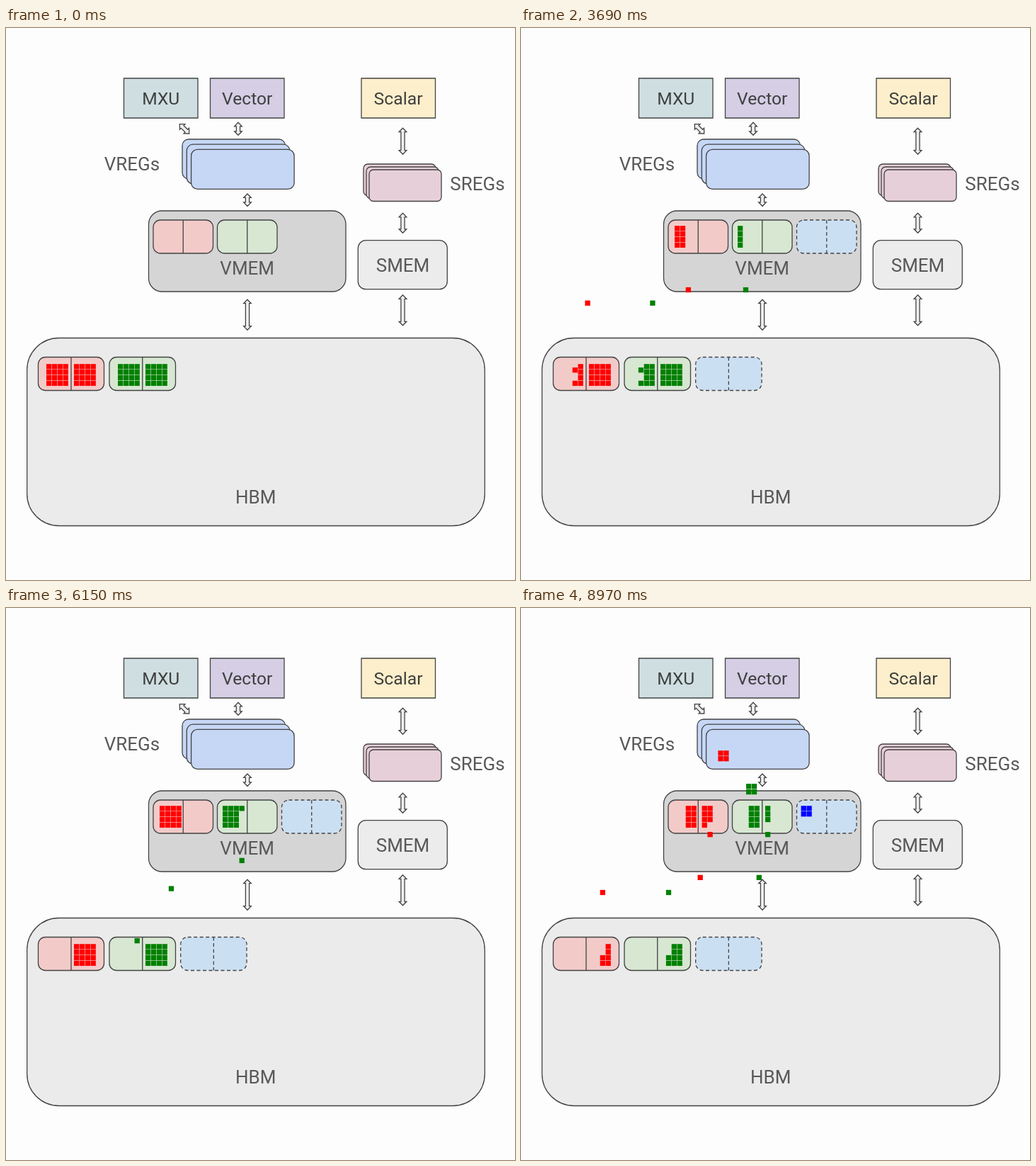
These frames come from a looping animation (719x779 px, 9000 ms). An HTML page with a canvas:

```html
<!DOCTYPE html>
<html lang="en">
<head>
<meta charset="utf-8">
<title>Memory pipeline</title>
<style>
  html, body { margin: 0; width: 100%; height: 100%; overflow: hidden; background: #fdfdfd; }
  canvas { display: block; }
</style>
</head>
<body>
<canvas id="stage" width="719" height="779"></canvas>
<script>
const ctx = document.getElementById('stage').getContext('2d');
const LOOP = 9000, INK = '#434343', LABEL = '#595959';
const PITCH = 7.85, CELL = 7.3;
const HBM_Y = 474.2, VMEM_Y = 279.2, VREG_Y = 185.5;
const clamp = (v, lo, hi) => Math.min(hi, Math.max(lo, v));
const smooth = p => p * p * (3 - 2 * p);

// Left edges of the 4 x 4 grids; each stream has two halves.
const streams = [
  { color: '#ff0000', hbm: [57, 96], vmem: [217, 255.6], vreg: 278.4, lag: 0, tileLag: 0 },
  { color: '#008000', hbm: [158, 197], vmem: [306, 345], vreg: 320.4, lag: 4, tileLag: 3 }
];
const output = { color: '#0000ff', vreg: 362.4, vmem: 395.6 };

// Time at which the cell queue reaches a given slot; one slot is one leg of a route.
const clockPoints = [[953, 0], [1620, 2.5], [2970, 7.41], [7380, 23.93], [8970, 29.86], [9238, 30.86]];
function slotAt(t) {
  const i = Math.max(1, clockPoints.findIndex(p => p[0] > t));
  const [t0, s0] = clockPoints[i - 1], [t1, s1] = clockPoints[i];
  return s0 + (s1 - s0) * (t - t0) / (t1 - t0);
}
const COMPUTE_START = 6868, COMPUTE_LEG = 152, COMPUTE_CYCLE = 9;

// Three equal legs: half the height, the full width, the other half of the height.
function route(dx, dy, legs) {
  const leg = i => clamp(legs - i, 0, 1);
  return [dx * leg(1), dy / 2 * (leg(0) + leg(2))];
}

function box(x, y, w, h, r, fill, dashed) {
  ctx.beginPath();
  ctx.roundRect(x, y, w, h, r);
  ctx.fillStyle = fill;
  ctx.fill();
  ctx.setLineDash(dashed ? [5, 3.5] : []);
  ctx.stroke();
}

function pair(x, y, w, h, fill, dashed) {
  box(x, y, w, h, 10, fill, dashed);
  ctx.beginPath();
  ctx.moveTo(x + w / 2, y);
  ctx.lineTo(x + w / 2, y + h);
  ctx.stroke();
  ctx.setLineDash([]);
}

function stack(x, y, w, h, r, stepX, stepY, fill) {
  for (let i = 0; i < 3; i++) box(x + i * stepX, y + i * stepY, w, h, r, fill);
}

function label(text, x, y, size = 26, color = LABEL) {
  ctx.font = `${size}px Roboto, sans-serif`;
  ctx.textAlign = 'center';
  ctx.fillStyle = color;
  ctx.fillText(text, x, y);
}

function arrow(x, y, length, angle = 0) {
  const end = length / 2, neck = end - 5.5;
  ctx.save();
  ctx.translate(x, y);
  ctx.rotate(angle);
  ctx.beginPath();
  for (const [px, py] of [[0, -end], [5.3, -neck], [2.6, -neck], [2.6, neck], [5.3, neck],
    [0, end], [-5.3, neck], [-2.6, neck], [-2.6, -neck], [-5.3, -neck]]) ctx.lineTo(px, py);
  ctx.closePath();
  ctx.fillStyle = '#eeeeee';
  ctx.fill();
  ctx.stroke();
  ctx.restore();
}

function drawDiagram(t) {
  ctx.fillStyle = '#fdfdfd';
  ctx.fillRect(0, 0, 719, 779);
  ctx.strokeStyle = INK;
  ctx.lineWidth = 1.3;

  box(166.5, 71, 104.5, 56, 0, '#cfdfe1');
  box(288.5, 71, 104.5, 56, 0, '#d5cee5');
  box(502, 71, 104.5, 56, 0, '#fdefcb');
  stack(249, 157, 145.5, 56, 9, 6.3, 7.2, '#c6d7f6');
  stack(505, 192, 102, 44.5, 6, 4, 4, '#e7cfd9');
  box(201.5, 258, 278.5, 114, 19, '#d5d5d5');
  box(497.3, 299.7, 126, 69, 11, '#ececec');
  box(29.7, 437.5, 646.6, 265, 45, '#ebebeb');

  pair(208, 271, 84.5, 47, '#f2cbc9');
  pair(298.5, 271, 84.5, 47, '#d7e7d2');
  pair(45.5, 464.5, 93, 47, '#f2cbc9');
  pair(146, 464.5, 93.5, 47, '#d7e7d2');
  ctx.globalAlpha = smooth(clamp(t / 950, 0, 1));
  pair(389.5, 271, 84.5, 47, '#cbdff2', true);
  pair(246.7, 464.5, 93.3, 47, '#cbdff2', true);
  ctx.globalAlpha = 1;

  arrow(252, 142.3, 19, -Math.PI / 4);
  arrow(328, 142.3, 18);
  arrow(341, 242.7, 17.5);
  arrow(341, 404.7, 43);
  arrow(560.5, 159.7, 37);
  arrow(560.5, 275.3, 28);
  arrow(560.5, 398.3, 43);

  label('MXU', 218.8, 108, 24.6, '#3f3f3f');
  label('Vector', 340.7, 108, 24.6, '#3f3f3f');
  label('Scalar', 554, 108, 24.8, '#3f3f3f');
  label('VREGs', 178, 201);
  label('SREGs', 666, 228.5);
  label('VMEM', 340.7, 347.5);
  label('SMEM', 560.5, 344);
  label('HBM', 352.7, 670.5);
}

function drawCell(x, y, col, row, color) {
  ctx.fillStyle = color;
  ctx.fillRect(x + col * PITCH, y + row * PITCH, CELL, CELL);
}

function drawStream(stream, slot, step) {
  for (let half = 0; half < 2; half++) {
    for (let k = 0; k < 16; k++) {
      const col = k >> 2, row = k & 3;
      const tile = half === 0 && col < 2 ? row >> 1 : -1;
      if (tile === 0 && step >= COMPUTE_CYCLE) continue;

      let [dx, dy] = route(stream.vmem[half] - stream.hbm[half], VMEM_Y - HBM_Y,
        slot - half * 20 - stream.lag - k);
      if (tile >= 0) {
        const [tx, ty] = route(stream.vreg - stream.vmem[0], VREG_Y - VMEM_Y,
          step - tile * COMPUTE_CYCLE - stream.tileLag);
        dx += tx;
        dy += ty;
      }
      drawCell(stream.hbm[half] + dx, HBM_Y + dy, col, row, stream.color);
    }
  }
}

function drawOutput(step) {
  if (step < 6) return;
  const [dx, dy] = route(output.vmem - output.vreg, VMEM_Y - VREG_Y, step - COMPUTE_CYCLE);
  for (let k = 0; k < 4; k++) drawCell(output.vreg + dx, VREG_Y + dy, k >> 1, k & 1, output.color);
}

function render(now) {
  const t = now % LOOP;
  const step = (t - COMPUTE_START) / COMPUTE_LEG;
  drawDiagram(t);
  for (const stream of streams) drawStream(stream, slotAt(t), step);
  drawOutput(step);
  requestAnimationFrame(render);
}

const start = performance.now();
requestAnimationFrame(function first() { render(Math.max(0, performance.now() - start)); });
</script>
</body>
</html>
```
